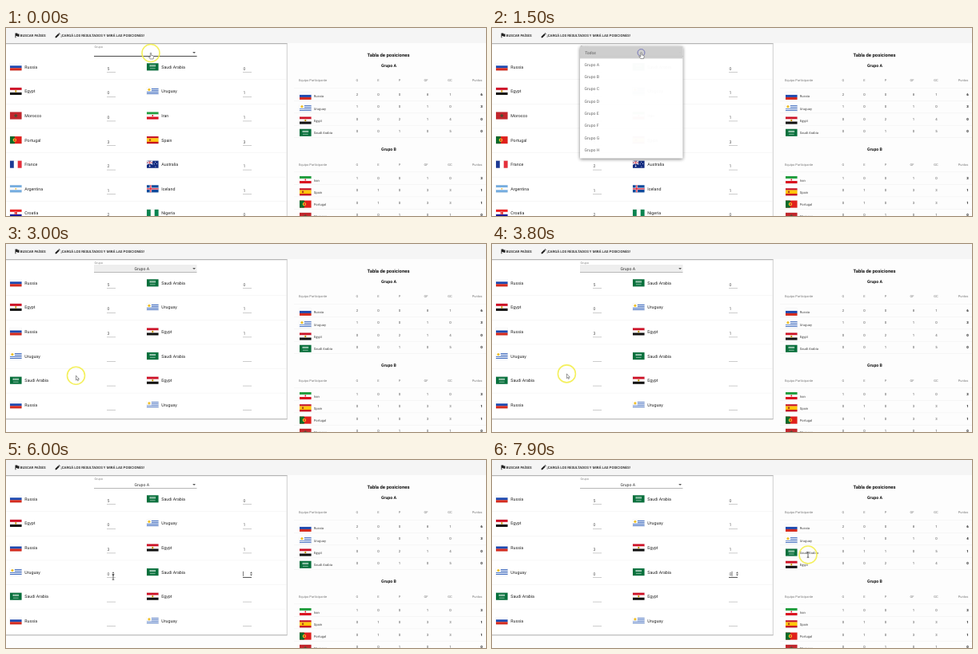
An HTML page that plays this animation: 600 by 236 pixels, repeating every 8 s.

```html
<!DOCTYPE html>
<html lang="es">
<head>
<meta charset="utf-8">
<style>
html, body { margin: 0; width: 100%; height: 100%; overflow: hidden; background: #fdfdfd }
svg { display: block; font-family: Roboto, Arial, sans-serif; text-rendering: geometricPrecision }
</style>
</head>
<body>
<svg id="stage" width="600" height="236" viewBox="0 0 600 236"></svg>
<script>
const LOOP = 8000;

const rect = (x, y, w, h, fill, more = '') =>
  `<rect x="${x}" y="${y}" width="${w}" height="${h}" fill="${fill}" ${more}/>`;
const path = (d, fill, more = '') => `<path d="${d}" fill="${fill}" ${more}/>`;
const dot = (x, y, r, fill) => `<circle cx="${x}" cy="${y}" r="${r}" fill="${fill}"/>`;
// y is the middle of the line of text
const text = (x, y, size, s, fill = '#333', more = '') =>
  `<text x="${x}" y="${y + size * .36}" font-size="${size}" fill="${fill}" ${more}>${s}</text>`;
const group = (id, body, more = '') => `<g id="${id}" ${more}>${body}</g>`;
const MID = 'text-anchor="middle"', MEDIUM = 'font-weight="500"', BOLD = 'font-weight="700"';

// Flags live in a 30 x 18 box
const rows = (...c) => c.map((k, i) => rect(0, i * 18 / c.length, 30, 18 / c.length + .1, k)).join('');
const cols = (...c) => c.map((k, i) => rect(i * 30 / c.length, 0, 30 / c.length + .1, 18, k)).join('');
const cross = (c, w) => path('M10 0V18M0 9H30', 'none', `stroke="${c}" stroke-width="${w}"`);
const flags = {
  'Russia': rows('#fff', '#1c49b0', '#d52b1e'),
  'Saudi Arabia': rows('#08703c') + path('M7 5H23M7 7.5H23M9 4V8M13 4V8M17 4V8M21 4V8M8 13H22', 'none', 'stroke="#dfeee5" stroke-width="1.2"'),
  'Egypt': rows('#ce1126', '#fff', '#111') + rect(13, 6.8, 4, 4.4, '#c09300'),
  'Uruguay': rows(...'wbwbwbwbw'.split('').map(c => c == 'w' ? '#fff' : '#2456b5')) + rect(0, 0, 12, 10, '#fff') + dot(6, 5, 3.3, '#f0bf2a'),
  'Morocco': rows('#c1272d') + path('M15 5L17.5 12.5L11 8H19L12.5 12.5Z', 'none', 'stroke="#175f35"'),
  'Iran': rows('#239f40', '#fff', '#da1020') + dot(15, 9, 2, '#da1020'),
  'Portugal': rows('#e0201c') + rect(0, 0, 12, 18, '#0a6a2a') + dot(12, 9, 4.4, '#f5df2a') + rect(10, 6.5, 4, 5, '#e0201c'),
  'Spain': rows('#c60b1e', '#ffc400', '#ffc400', '#c60b1e') + rect(6, 6.5, 4.5, 5, '#b5441e'),
  'France': cols('#1d3a94', '#fff', '#e5303c'),
  'Australia': rows('#102a80') + path('M0 0L15 9M15 0L0 9M7.5 0V9M0 4.5H15', 'none', 'stroke="#fff" stroke-width="2.4"') +
    path('M7.5 0V9M0 4.5H15', 'none', 'stroke="#d8202c" stroke-width="1.3"') +
    dot(7.5, 13.5, 1.7, '#fff') + [[22, 3], [26, 7], [19, 8], [22.5, 14.5]].map(p => dot(...p, 1.1, '#fff')).join(''),
  'Argentina': rows('#74acdf', '#fff', '#74acdf') + dot(15, 9, 1.8, '#f0b52a'),
  'Iceland': rows('#0b4a9c') + cross('#fff', 5) + cross('#dc1e35', 2.4),
  'Croatia': rows('#f02020', '#fff', '#171796') + rect(11.5, 3.5, 7, 9, '#e02525') +
    path('M13 4V12.5M16.5 4V12.5', 'none', 'stroke="#fff" stroke-width="1.4" stroke-dasharray="1.6"'),
  'Nigeria': cols('#0a8450', '#fff', '#0a8450')
};
const flag = (name, x, y) => `<g transform="translate(${x} ${y - 4.5}) scale(.485 .5)">` +
  rect(0, 0, 30, 18, 'none', 'stroke="#ddd" stroke-width=".8"') + flags[name] + '</g>';

// Match list: home, goals, away, goals; goals may be blank
const rowY = i => 48.8 + 30.6 * i;
const side = (name, goals, x, y, goalX) => flag(name, x, y) + text(x + 18.3, y, 5.3, name, '#222') +
  text(goalX + .5, y + 2.2, 5.2, goals, '#555') + rect(goalX, y + 6.6, 11, .6, '#aaa');
const matches = list => list.map(([a, ga, b, gb], i) => {
  const y = rowY(i);
  return side(a, ga, 5, y, 126) + side(b, gb, 176, y, 296) + (i ? rect(0, y - 15, 351, .6, '#f2f2f2') : '');
}).join('');
const panel = bottom => rect(0, 19, 351, bottom - 19, '#fff') + rect(0, 19, 351.5, 1.2, '#b4b4b4') +
  rect(350.8, 19, .9, bottom - 19, '#c9c9c9') + rect(0, bottom - .8, 351.5, 1.2, '#b8b8b8');

const allMatches = [
  ['Russia', 5, 'Saudi Arabia', 0], ['Egypt', 0, 'Uruguay', 1], ['Morocco', 0, 'Iran', 1],
  ['Portugal', 3, 'Spain', 3], ['France', 2, 'Australia', 1], ['Argentina', 1, 'Iceland', 1],
  ['Croatia', 2, 'Nigeria', 0]];
const groupMatches = [
  ['Russia', 5, 'Saudi Arabia', 0], ['Egypt', 0, 'Uruguay', 1], ['Russia', 3, 'Egypt', 1],
  ['Uruguay', '', 'Saudi Arabia', ''], ['Saudi Arabia', '', 'Egypt', ''], ['Russia', '', 'Uruguay', '']];

// Standings
const colX = [439, 465.5, 492, 527, 555.5, 594.5];
const headX = [439, 465.5, 492, 525, 555, 589];
const standings = (title, top, teams) =>
  text(478.5, top, 5.2, title, '#111', `${MID} ${BOLD}`) +
  text(366, top + 18.5, 4.05, 'Equipo Participante', '#777') +
  ['G', 'E', 'P', 'GF', 'GC', 'Puntos'].map((s, i) => text(headX[i], top + 18.5, 4.05, s, '#777', MID)).join('') +
  rect(360, top + 28, 240, .5, '#eee') +
  teams.map(([name, points], r) => {
    const y = top + 37.9 + 15.3 * r;
    return flag(name, 367, y) + text(384.7, y + .6, 4.15, name, '#444') +
      [...points].map((s, i) => text(colX[i], y - 1.9, 4.3, s, i == 5 ? '#111' : '#555',
        MID + ' ' + (i == 5 ? BOLD : ''))).join('') + rect(360, y + 5.9, 240, .5, '#eee');
  }).join('');
const before = [['Russia', '200816'], ['Uruguay', '100103'], ['Egypt', '002140'], ['Saudi Arabia', '001050']];
const after = [['Russia', '200816'], ['Uruguay', '110104'], ['Saudi Arabia', '011051'], ['Egypt', '002140']];
const groupB = [['Iran', '100103'], ['Spain', '010331'], ['Portugal', '010331'], ['Morocco', '001010']];

const menuRow = i => 23.1 + 15.27 * i;
const menu = rect(110, 23.1, 128.5, 140.5, '#fff', 'style="filter:drop-shadow(0 1.5px 2px #0008)"') +
  rect(110, menuRow(0), 128.5, 15.27, '#cecece', 'id="todos"') +
  rect(110, menuRow(1), 128.5, 15.27, '#eee', 'id="hover"') +
  text(116, 30.8, 5.2, 'Todos', '#555', 'font-style="italic"') +
  [...'ABCDEFGH'].map((c, i) => text(115.5, menuRow(i + 1) + 7.7, 5.2, 'Grupo ' + c, '#666')).join('');

const spinner = (id, x) => group(id,
  path(`M${x - 1.4} 142.2L${x} 140.2L${x + 1.4} 142.2ZM${x - 1.4} 143.6L${x} 145.6L${x + 1.4} 143.6Z`, '#555'));
const focusLine = (id, x) => rect(x, 146.9, 11, .9, '#444', `id="${id}"`);
const ink = 'stroke="#555" stroke-width=".6" stroke-linejoin="round"';

document.getElementById('stage').innerHTML =
  rect(0, 0, 600, 19, '#f5f5f5') +
  path('M11.5 6.6H14.2L14.6 7.6H16.6V10.8H14.3L13.9 9.9H12.4V12.2H11.5Z', '#222') +
  text(17.7, 9.2, 4.35, 'BUSCAR PAÍSES', '#222', MEDIUM) +
  path('M61.6 12.2V10.8L65.4 7L66.8 8.4L63 12.2ZM65.8 6.6L66.4 6L67.8 7.4L67.2 8Z', '#222') +
  text(68.5, 9.2, 4.4, '¡CARGÁ LOS RESULTADOS Y MIRÁ LAS POSICIONES!', '#222', MEDIUM) +
  text(478, 34.3, 5.95, 'Tabla de posiciones', '#111', `${MID} ${BOLD}`) +
  group('tableBefore', standings('Grupo A', 47.5, before)) +
  group('tableAfter', standings('Grupo A', 47.5, after)) +
  standings('Grupo B', 152.6, groupB) +
  group('listAll', panel(240) + matches(allMatches)) +
  group('listGroup', panel(220) + matches(groupMatches)) +
  rect(110, 26, 128.5, 9, '#eee', 'id="selectFocus"') +
  text(110.5, 23.6, 3.9, 'Grupo', '#888') +
  rect(110, 35, 128.5, .7, '#999') +
  rect(110, 34.9, 128.5, 1.1, '#555', 'id="selectLine"') +
  text(169.8, 30.8, 5.2, 'Grupo A', '#333', `${MID} id="value"`) +
  path('M233.2 30H237L235.1 32Z', '#555') +
  text(126.5, 142.8, 5.2, '0', '#555', 'id="goalA"') + spinner('spinA', 134) + focusLine('lineA', 126) +
  text(296.5, 142.8, 5.2, '0', '#555', 'id="goalB"') + spinner('spinB', 306.5) + focusLine('lineB', 296) +
  rect(0, 139.8, .6, 6, '#222', 'id="caret"') +
  group('menu', menu) +
  group('pointer',
    '<circle id="ring" fill="none"/>' +
    group('hand', path('M-.7 0Q0 -.8 .7 0V2.8L3.3 3.5Q3.9 3.8 3.7 4.8L3.1 7.4H-.8L-2.7 4.6Q-2.2 3.7 -.7 5Z', '#fff', ink)) +
    group('arrow', path('M0 0V5.8L1.3 4.6L2.2 6.6L3 6.2L2.2 4.3H3.9Z', '#fff', ink)) +
    group('beam', path('M-1.3 -3.2H1.3M0 -3.2V3.2M-1.3 3.2H1.3', 'none', 'stroke="#222" stroke-width=".7"')));

const $ = id => document.getElementById(id);
const show = (id, on) => $(id).setAttribute('visibility', on ? 'visible' : 'hidden');
const clamp = v => Math.max(0, Math.min(1, v));

const route = [[0, 181, 31.5], [1000, 181, 31.5], [1400, 186.5, 31], [1700, 186.5, 31], [2050, 166.7, 41.7],
  [2350, 166.7, 41.7], [2900, 87.5, 165.2], [3600, 87.5, 165.2], [4500, 134, 147], [6900, 134, 147],
  [7800, 395, 119], [LOOP, 395, 119]];
const clicks = [1400, 2100, 4600];

function pointerAt(t) {
  const i = route.findIndex(p => p[0] > t);
  const [t0, x0, y0] = route[i - 1], [t1, x1, y1] = route[i];
  const k = (t - t0) / (t1 - t0), e = k * k * (3 - 2 * k);
  return [x0 + (x1 - x0) * e, y0 + (y1 - y0) * e];
}

function drawRing(t) {
  const ring = $('ring'), click = clicks.find(c => t >= c && t < c + 350);
  const set = (r, color, width, opacity) => Object.entries({ r, stroke: color, 'stroke-width': width, opacity })
    .forEach(([k, v]) => ring.setAttribute(k, v));
  if (click !== undefined) {
    const age = t - click, mix = clamp(age / 200);
    set(3 + age / 70, `rgb(${60 + 110 * mix},${60 + 110 * mix},${200 - 30 * mix})`, 1, 1 - clamp((age - 150) / 200));
  } else {
    const idle = t > 4600 && t < 6950 || t > 1400 && t < 1750;
    set(11, '#f3ee48', 1.6, idle ? 0 : .88);
  }
}

function draw(t) {
  const picked = t >= 2400, typedB = t >= 6500;
  const inA = t >= 4600 && t < 5800, inB = t >= 5800;
  show('listAll', !picked);
  show('listGroup', picked);
  show('value', picked);
  show('selectFocus', picked && t < 4600);
  show('selectLine', !picked);
  show('tableBefore', !typedB);
  show('tableAfter', typedB);

  $('menu').setAttribute('opacity', Math.min(clamp((t - 1400) / 103), clamp((2400 - t) / 100)));
  $('todos').setAttribute('fill', t < 1900 ? '#cecece' : '#dcdcdc');
  show('hover', t >= 1900 && !picked);

  show('goalA', t >= 5300);
  show('goalB', typedB);
  show('spinA', t >= 4500 && t < 7000);
  show('spinB', inB);
  show('lineA', inA);
  show('lineB', inB);
  show('caret', inA || inB);
  $('caret').setAttribute('x', inA ? (t < 5300 ? 126.6 : 129.8) : typedB ? 299.7 : 296.4);

  const [x, y] = pointerAt(t);
  $('pointer').setAttribute('transform', `translate(${x} ${y})`);
  const kind = t < 2400 ? 'hand' : t >= 4450 && t < 7000 || t >= 7700 ? 'beam' : 'arrow';
  for (const k of ['hand', 'arrow', 'beam']) show(k, k == kind);
  drawRing(t);
}

const start = performance.now();
function tick() {
  draw((performance.now() - start) % LOOP);
  requestAnimationFrame(tick);
}
tick();
</script>
</body>
</html>
```
